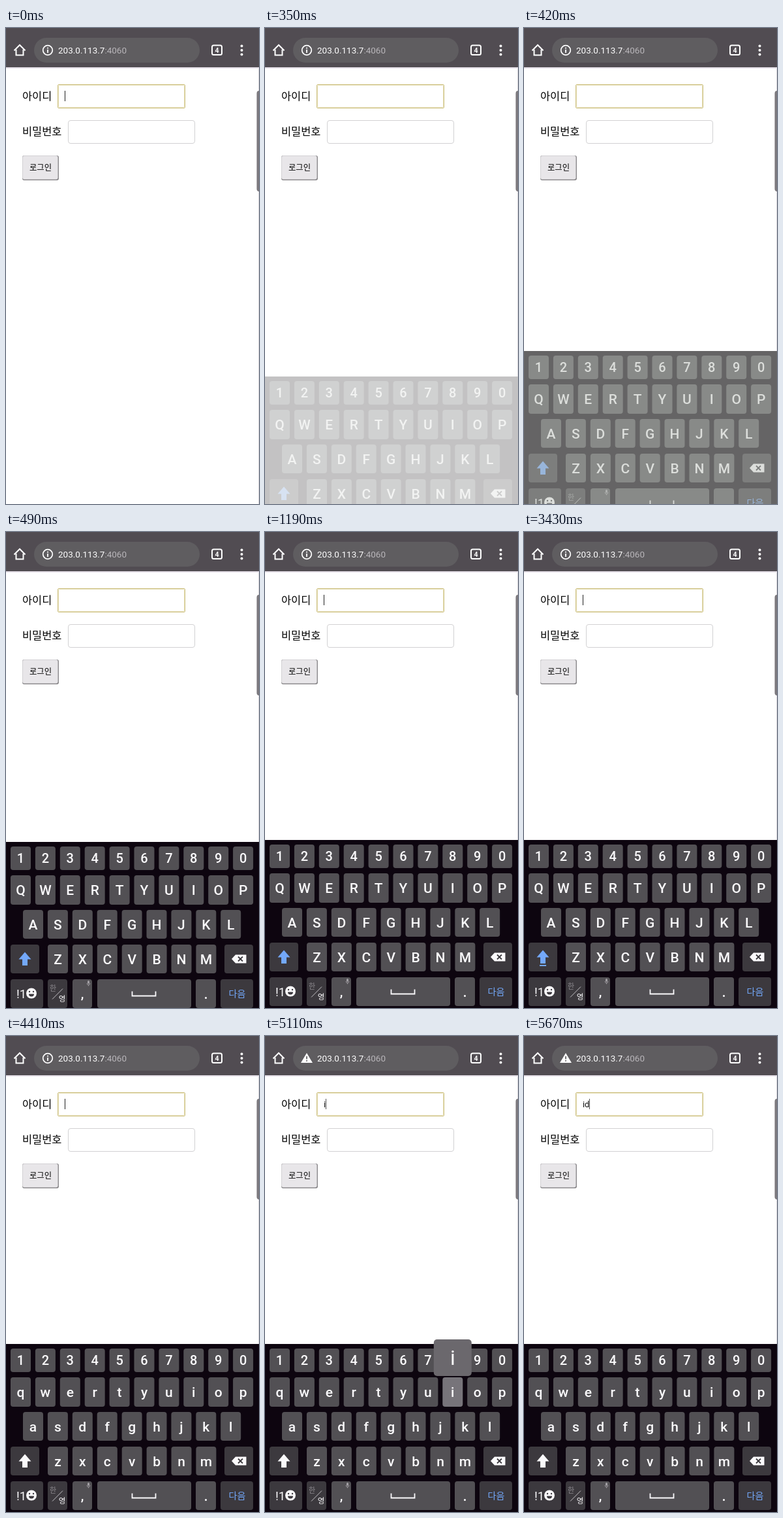
Animation of 388x728 px, one loop 5740 ms. Source, as an HTML page with a canvas:

```html
<!DOCTYPE html>
<html lang="ko">
<head>
<meta charset="utf-8">
<title>Login form</title>
<style>
  html, body { margin: 0; width: 100%; height: 100%; overflow: hidden; background: #fff; }
  canvas { display: block; }
</style>
</head>
<body>
<canvas id="stage" width="388" height="728"></canvas>
<script>
const ctx = document.getElementById('stage').getContext('2d');
const LOOP = 5740, STEP = 70;
const LATIN = 'Roboto, sans-serif';
const HANGUL = '"Noto Sans CJK KR", "Noto Sans CJK", sans-serif';
const WHITE = '#fbfafc', BLUE = '#73a8fa';
const KEY = '#525054', DARK_KEY = '#3c393e', PRESSED = '#77747a';
const HEADER = '#514c52', PILL = '#5f5d60';
const KEYBOARD_TOP = 471;

const ROWS = [
  { chars: '1234567890', x: 7, y: 478, h: 36, base: 503, size: 20 },
  { chars: 'QWERTYUIOP', x: 7, y: 522, h: 45, base: 552, size: 21 },
  { chars: 'ASDFGHJKL', x: 26, y: 575, h: 44, base: 604.5, size: 21 },
  { chars: 'ZXCVBNM', x: 64, y: 628, h: 44, base: 657.5, size: 21 }
];
const PITCH = 37.9, KEY_W = 31;

// Time of each tap and of its release
const TAPS = [
  { key: 'shift', from: 3150, to: 3290 },
  { key: 'shift', from: 4200, to: 4340 },
  { key: 'i', from: 4970, to: 5180 },
  { key: 'd', from: 5320, to: 5460 }
];

function box(x, y, w, h, r, fill, stroke, line = 1) {
  ctx.beginPath();
  ctx.roundRect(x, y, w, h, r);
  if (fill) { ctx.fillStyle = fill; ctx.fill(); }
  if (stroke) { ctx.strokeStyle = stroke; ctx.lineWidth = line; ctx.stroke(); }
}

function dot(x, y, r, color) {
  ctx.beginPath();
  ctx.arc(x, y, r, 0, Math.PI * 2);
  ctx.fillStyle = color;
  ctx.fill();
}

function path(points, color, line, closed) {
  ctx.beginPath();
  points.forEach(([x, y]) => ctx.lineTo(x, y));
  if (closed) ctx.closePath();
  if (line) {
    ctx.strokeStyle = color;
    ctx.lineWidth = line;
    ctx.stroke();
  } else {
    ctx.fillStyle = color;
    ctx.fill();
  }
}

function text(str, x, y, size, color, family = LATIN, align = 'left', weight = 400) {
  ctx.font = `${weight} ${size}px ${family}`;
  ctx.fillStyle = color;
  ctx.textAlign = align;
  ctx.fillText(str, x, y);
  return ctx.measureText(str).width;
}

function drawHeader(warning) {
  ctx.fillStyle = HEADER;
  ctx.fillRect(0, 0, 388, 60);
  ctx.fillStyle = '#e5e0e8';
  ctx.fillRect(0, 60, 388, 2);
  box(43, 15, 254, 38, 19, PILL);

  path([[12.5, 34.5], [21, 26], [29.5, 34.5]], '#fff', 2);
  path([[15.5, 33], [15.5, 41.5], [26.5, 41.5], [26.5, 33]], '#fff', 2);

  if (warning) {
    path([[64, 26], [73, 41], [55, 41]], '#fff', 0, true);
    ctx.fillStyle = PILL;
    ctx.fillRect(63.2, 31, 1.7, 4.5);
    ctx.fillRect(63.2, 37, 1.7, 1.8);
  } else {
    box(56.7, 26.7, 14.6, 14.6, 7.3, null, '#fff', 1.7);
    ctx.fillStyle = '#fff';
    ctx.fillRect(63.1, 33, 1.8, 5);
    ctx.fillRect(63.1, 29.8, 1.8, 1.8);
  }

  const width = text('203.0.113.7', 80, 39, 13.5, '#fff');
  text(':4060', 80 + width, 39, 13.5, '#b9b6ba');

  box(316, 26.5, 15, 14.5, 2.5, null, '#fff', 2);
  text('4', 323.5, 37.5, 10.5, '#fff', LATIN, 'center', 700);
  for (const y of [27.5, 34, 40.5]) dot(361.5, y, 2, '#fff');
}

function drawForm(typed, caret) {
  text('아이디', 25, 109.5, 16.4, '#000', HANGUL);
  text('비밀번호', 25, 163.8, 16.4, '#000', HANGUL);

  box(79.5, 86.5, 195, 36, 1.5, '#fff', '#cdc080');
  box(80.5, 87.5, 193, 34, 1, null, '#e6dfb9');
  box(95.5, 141.5, 194, 35, 3.5, '#fff', '#d2d1d3');

  box(25, 195, 56, 38, 3, '#8c8a8d');
  box(25, 195, 54.5, 36.5, 3, '#d3d1d4');
  box(26, 196, 53.3, 35.3, 2, '#e8e6e9');
  text('로그인', 53, 218.3, 12.3, '#000', HANGUL, 'center');

  const width = text(typed, 90, 108.5, 12.8, '#111');
  if (caret) {
    ctx.fillStyle = typed ? '#555' : '#222';
    ctx.fillRect(90 + Math.round(width), 96, 1, 16);
  }

  box(384.5, 96, 8, 154, 4, '#7c797e');
}

function drawShift(mode, pressed) {
  const color = mode === 'lower' ? WHITE : BLUE;
  box(7, 628, 44, 44, 4, pressed ? PRESSED : DARK_KEY);
  path([[29, 639.5], [38.5, 650.5], [33, 650.5], [33, 660], [25, 660], [25, 650.5], [19.5, 650.5]], color, 0, true);
  if (mode === 'caps') {
    ctx.fillStyle = color;
    ctx.fillRect(24, 662, 10, 2);
  }
}

function drawBackspace() {
  box(335, 628, 44, 44, 4, DARK_KEY);
  path([[346, 650], [352, 643.5], [368.5, 643.5], [368.5, 656.5], [352, 656.5]], WHITE, 0, true);
  path([[356, 646.5], [363, 653.5]], DARK_KEY, 1.8);
  path([[363, 646.5], [356, 653.5]], DARK_KEY, 1.8);
}

function drawBottomRow() {
  const keys = [[7, 50], [64, 30], [102, 30, KEY], [140, 144, KEY], [291, 31, KEY], [329, 50]];
  for (const [x, w, color = DARK_KEY] of keys) box(x, 681, w, 44, 4, color);

  text('!1', 16, 709.5, 18.5, WHITE);
  dot(39, 702.5, 8, WHITE);
  dot(36, 700, 1.2, DARK_KEY);
  dot(42, 700, 1.2, DARK_KEY);
  ctx.beginPath();
  ctx.arc(39, 703.5, 4, 0, Math.PI);
  ctx.fillStyle = DARK_KEY;
  ctx.fill();

  text('한', 72, 699, 11, '#8d8a8f', HANGUL, 'center');
  path([[71, 711.5], [87, 695.5]], '#c5c3c7', 1);
  text('영', 86, 715, 11.5, WHITE, HANGUL, 'center');

  text(',', 117, 710, 21, WHITE, LATIN, 'center', 500);
  box(125, 683, 3, 5, 1.5, '#a29fa4');
  path([[124, 687], [125, 689.5], [128, 689.5], [129, 687]], '#a29fa4', 0.8);
  path([[126.5, 689], [126.5, 691.5]], '#a29fa4', 0.8);

  path([[193.5, 699.5], [193.5, 706.5], [229.5, 706.5], [229.5, 699.5]], WHITE, 1.8);
  text('.', 306.5, 711, 22, WHITE, LATIN, 'center', 500);
  text('다음', 354.5, 708, 14.1, BLUE, HANGUL, 'center');
}

function drawKeyboard(mode, tapped) {
  ctx.fillStyle = '#0d050f';
  ctx.fillRect(0, KEYBOARD_TOP, 388, 728 - KEYBOARD_TOP);
  let preview = null;
  for (const row of ROWS) {
    [...row.chars].forEach((char, i) => {
      const x = row.x + i * PITCH;
      const label = mode === 'lower' ? char.toLowerCase() : char;
      const pressed = label === tapped;
      box(x, row.y, KEY_W, row.h, 4, pressed ? PRESSED : KEY);
      text(label, x + KEY_W / 2, row.base, row.size, WHITE, LATIN, 'center', 500);
      if (pressed) preview = { label, x: x + KEY_W / 2, y: row.y };
    });
  }
  drawShift(mode, tapped === 'shift');
  drawBackspace();
  drawBottomRow();
  if (preview) {
    box(preview.x - 29, preview.y - 58, 58, 56, 5, '#6b686d');
    text(preview.label, preview.x, preview.y - 19, 32, WHITE, LATIN, 'center');
  }
}

function caretVisible(t) {
  if (t >= 5040) return true;
  if (t >= 4060) return t < 4620;
  return (t + 140) % 1050 < 490;
}

function slide(t) {
  if (t < 350) return null;
  if (t < 420) return { offset: 62, veil: 'rgba(240,242,240,.8)' };
  if (t < 490) return { offset: 23, veil: 'rgba(190,196,188,.5)' };
  return { offset: t < 560 ? 3 : 0, veil: 'transparent' };
}

// The keyboard fades in as one sheet under a thinning veil.
function drawSlidingKeyboard(t) {
  const pose = slide(t);
  if (!pose) return;
  const mode = t < 3220 ? 'shift' : t < 4270 ? 'caps' : 'lower';
  const tap = TAPS.find(({ from, to }) => t >= from && t < to);
  ctx.save();
  ctx.translate(0, pose.offset);
  drawKeyboard(mode, tap && tap.key);
  ctx.fillStyle = pose.veil;
  ctx.fillRect(0, KEYBOARD_TOP, 388, 728 - KEYBOARD_TOP);
  ctx.restore();
}

function draw(now) {
  const t = Math.floor((now % LOOP) / STEP) * STEP;
  ctx.fillStyle = '#fff';
  ctx.fillRect(0, 0, 388, 728);
  drawHeader(t >= 5040);
  drawForm(t < 5040 ? '' : t < 5390 ? 'i' : 'id', caretVisible(t));
  ctx.fillStyle = '#dedbe0';
  ctx.fillRect(387, 62, 1, 34);
  ctx.fillRect(387, 250, 1, 478);
  drawSlidingKeyboard(t);
}

const start = performance.now();
function tick() {
  draw(performance.now() - start);
  requestAnimationFrame(tick);
}
tick();
</script>
</body>
</html>
```
